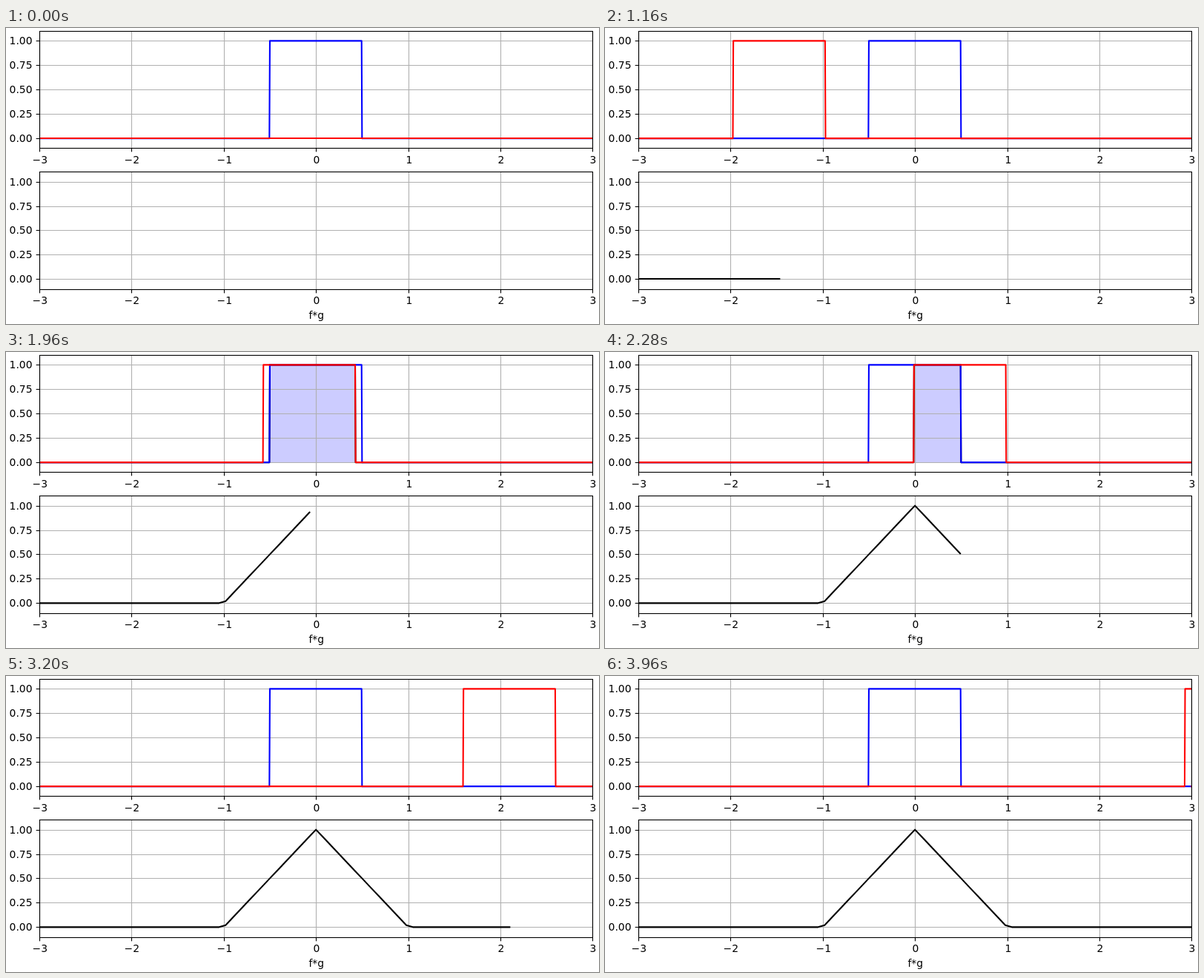
Write an HTML page with a canvas that moves like this. It is 800 by 400 pixels and loops after 4000 ms.

```html
<!DOCTYPE html>
<html lang="en">
<head>
<meta charset="utf-8">
<title>Convolution of two boxes</title>
<style>
  html, body { margin: 0; width: 100%; height: 100%; overflow: hidden; background: #fff; }
  canvas { display: block; }
</style>
</head>
<body>
<canvas id="stage" width="800" height="400"></canvas>
<script>
const ctx = document.getElementById('stage').getContext('2d');
const STEP_MS = 40, STEPS = 100, SAMPLE = 0.005;
const UNIT_X = 124.38, UNIT_Y = 131.75, MID_X = 418.15;
const LEFT = 45.5, RIGHT = 791.5;
const THIN = 1.11, THICK = 2.083, TICK = 4.86;
const TOP_ZERO = 149.1, BOTTOM_ZERO = 339.35;

const crisp = v => Math.round(v) + 0.5;
const toX = v => MID_X + v * UNIT_X;
const shiftAt = step => -3.5 + 0.07 * step;
const overlapAt = shift => Math.max(0, 1 - Math.abs(shift));

function stroke(points, color, width) {
  ctx.beginPath();
  points.forEach(([x, y]) => ctx.lineTo(x, y));
  ctx.strokeStyle = color;
  ctx.lineWidth = width;
  ctx.stroke();
}

// A sampled box over [a, b); its sides lean by one sample.
function boxPoints(a, b, zero) {
  const one = zero - UNIT_Y;
  return [[toX(-3), zero], [toX(a - SAMPLE), zero], [toX(a), one],
          [toX(b - SAMPLE), one], [toX(b), zero], [toX(3), zero]];
}

// Flat curves sit on whole pixels.
function flatPoints(zero, end = 3) {
  const y = Math.round(zero);
  return [[toX(-3), y], [toX(end), y]];
}

function drawAxes(zero, drawFill, drawCurves) {
  const top = crisp(zero - 1.1 * UNIT_Y), bottom = crisp(zero + 0.1 * UNIT_Y);
  const clipped = draw => {
    ctx.save();
    ctx.beginPath();
    ctx.rect(LEFT, top, RIGHT - LEFT, bottom - top);
    ctx.clip();
    draw();
    ctx.restore();
  };
  ctx.lineCap = 'butt';
  ctx.lineJoin = 'round';
  clipped(drawFill);

  ctx.fillStyle = '#000';
  ctx.textAlign = 'center';
  for (let v = -3; v <= 3; v++) {
    const x = crisp(toX(v));
    stroke([[x, top], [x, bottom]], '#b0b0b0', THIN);
    stroke([[x, bottom], [x, bottom + TICK]], '#000', THIN);
    ctx.fillText(String(v).replace('-', '\u2212'), x + 0.3, Math.round(zero + 34));
  }
  ctx.textAlign = 'right';
  for (let v = 0; v <= 1; v += 0.25) {
    const y = crisp(zero - v * UNIT_Y);
    stroke([[LEFT, y], [RIGHT, y]], '#b0b0b0', THIN);
    stroke([[LEFT - TICK, y], [LEFT, y]], '#000', THIN);
    ctx.fillText(v.toFixed(2), 35.5, Math.round(y + 4.9));
  }

  ctx.lineCap = 'square';
  clipped(drawCurves);
  ctx.strokeStyle = '#000';
  ctx.lineWidth = THIN;
  ctx.lineJoin = 'miter';
  ctx.strokeRect(LEFT, top, RIGHT - LEFT, bottom - top);
}

function drawStep(step) {
  const shift = shiftAt(step);
  const overlaps = overlapAt(shift) > 1e-6;
  const product = overlaps
    ? boxPoints(Math.max(-0.5, shift - 0.5), Math.min(0.5, shift + 0.5), TOP_ZERO)
    : flatPoints(TOP_ZERO);
  const moving = step ? boxPoints(shift - 0.5, shift + 0.5, TOP_ZERO) : flatPoints(TOP_ZERO);

  ctx.fillStyle = '#fff';
  ctx.fillRect(0, 0, 800, 400);
  ctx.font = '13.89px "DejaVu Sans", sans-serif';

  drawAxes(TOP_ZERO, () => {
    if (!overlaps) return;
    ctx.beginPath();
    product.forEach(([x, y]) => ctx.lineTo(x, y));
    ctx.fillStyle = 'rgba(0, 0, 255, 0.2)';
    ctx.fill();
  }, () => {
    stroke(product, '#000', THICK);
    stroke(boxPoints(-0.5, 0.5, TOP_ZERO), '#00f', THICK);
    stroke(moving, '#f00', THICK);
  });

  drawAxes(BOTTOM_ZERO, () => {}, () => {
    const trace = Array.from({ length: step + 1 }, (_, k) =>
      [toX(shiftAt(k)), BOTTOM_ZERO - UNIT_Y * overlapAt(shiftAt(k))]);
    const rises = shift > -1;
    if (rises) stroke(trace, '#000', THICK);
    else if (shift > -3) stroke(flatPoints(BOTTOM_ZERO, shift), '#000', THICK);
  });

  ctx.fillStyle = '#000';
  ctx.textAlign = 'center';
  ctx.fillText('f*g', crisp(MID_X) + 0.3, 393);
}

function tick() {
  drawStep(Math.floor(performance.now() / STEP_MS + 1e-6) % STEPS);
  requestAnimationFrame(tick);
}
tick();
</script>
</body>
</html>
```
